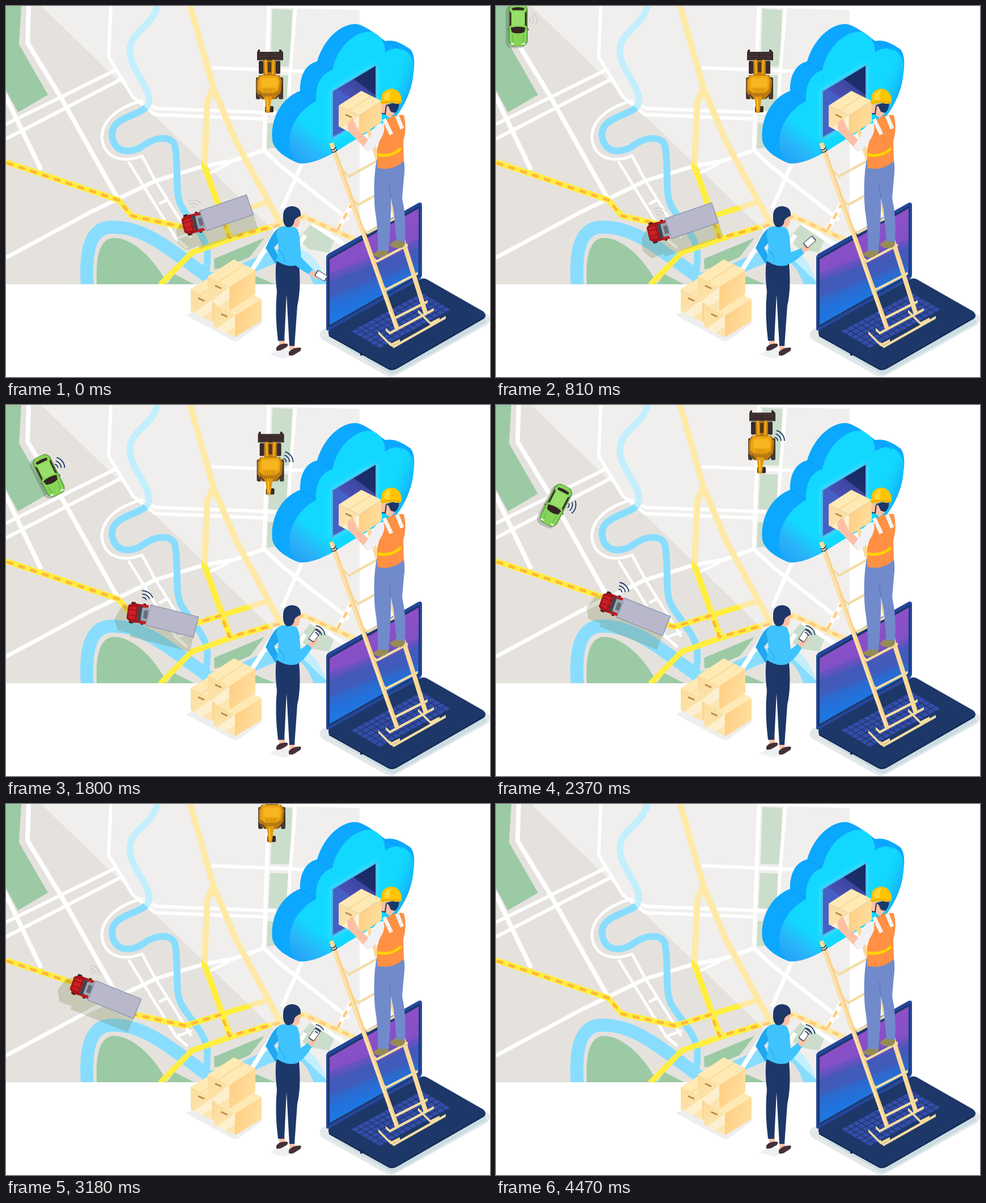
Recreate the animation shown at these times as an HTML page with a canvas. Size 854 px wide and 656 px high, loop 4500 ms.

```html
<!DOCTYPE html>
<html lang="en">
<head>
<meta charset="utf-8">
<title>Delivery tracking</title>
<style>
html, body { margin: 0; width: 100%; height: 100%; overflow: hidden; background: #fff; }
canvas { display: block; }
</style>
</head>
<body>
<canvas id="stage" width="854" height="656"></canvas>
<script>
const W = 854, H = 656, LOOP = 4500, NAVY = '#1d3768';
const stage = document.getElementById('stage').getContext('2d');
let g = stage;

const fill = (color, d) => { g.fillStyle = color; g.fill(new Path2D(d)); };
const line = (color, width, d, dash = []) => {
  g.strokeStyle = color;
  g.lineWidth = width;
  g.setLineDash(dash);
  g.stroke(new Path2D(d));
  g.setLineDash([]);
};
const ramp = (x0, y0, x1, y1, ...stops) => {
  const r = g.createLinearGradient(x0, y0, x1, y1);
  stops.forEach(([at, color]) => r.addColorStop(at, color));
  return r;
};
const rect = (color, x, y, w, h, r = 0) => {
  g.fillStyle = color;
  g.beginPath();
  g.roundRect(x, y, w, h, r);
  g.fill();
};
const placed = (x, y, degrees, draw) => {
  g.save();
  g.translate(x, y);
  g.rotate(degrees * Math.PI / 180);
  draw();
  g.restore();
};
// Draws a right half and its mirror image about x = 0
const mirrored = draw => {
  for (const side of [1, -1]) {
    g.save();
    g.scale(side, 1);
    draw();
    g.restore();
  }
};
function layer(draw) {
  const canvas = document.createElement('canvas');
  canvas.width = W;
  canvas.height = H;
  g = canvas.getContext('2d');
  g.lineJoin = 'round';
  draw();
  g = stage;
  return canvas;
}

// Smooth 0 to 1 between two times
const ease = (from, to, t) => {
  const u = Math.min(1, Math.max(0, (t - from) / (to - from)));
  return u * u * (3 - 2 * u);
};
const since = (t, from) => Math.max(0, t - from);
const signal = t => ease(950, 1400, t) - ease(2550, 3050, t);

const FULL = { land: '#e5e2de', water: '#88ddff', green: '#9ccaa5', road: '#ffee40', dash: '#ffb63c' };
const PALE = { land: '#f0efed', water: '#c3effc', green: '#cbdecb', road: '#ffe9a6', dash: '#ffcb7c' };

function drawMap(c) {
  fill(c.land, 'M0 0H470L624 5V492H0Z');
  fill(c.green, 'M0 0H27L23 68 74 157 21 188 0 149Z');
  fill(c.green, 'M470 5L505 7 501 107 467 106ZM466 122L501 123 498 187 463 184ZM462 207L480 208V250L460 252Z');
  fill(c.green, 'M160 492C158 446 164 411 190 410 222 409 264 448 284 492Z');
  fill(c.green, 'M284 492L297 474 332 492ZM367 447L456 410 430 444 368 470ZM412 492L442 478 475 492Z');
  fill(c.green, 'M515 412L538 386 583 406 570 436 535 430Z');

  const delta = 'M144 500C138 430 150 391 187 391 246 390 290 432 354 477';
  const reach = 'M354 482C410 486 440 445 505 437 535 442 545 465 556 495';
  for (const d of [delta, reach]) line(c.land, 33, d);
  for (const d of [delta, reach]) line(c.water, 23, d);

  line('#fff', 8, 'M40 0L38 65 97 162 197 340M-2 157L62 290');
  line('#fff', 6, 'M0 209L194 113M0 235L204 129M185 0L181 90 224 161 263 192 462 200M243 171L265 181 476 189');
  line('#fff', 7, 'M0 445L150 364 264 309 349 283 400 274 455 255');
  line('#fff', 5, 'M242 167C200 178 170 200 169 232 172 268 204 279 240 265L262 306 327 410M216 275L300 411 328 401M270 350L286 342M300 411L320 428M350 300L395 278');
  line('#fff', 7, 'M464 0L455 255 487 285 605 378M523 277L487 358');
  line('#fff', 6, 'M511 0L501 122 496 215M362 109L535 116M468 0L624 4');
  line('#fff', 8, 'M478 398L418 492M540 384L600 424M528 405L505 440M584 398L610 350');

  line(c.water, 12, 'M267 0C258 40 214 45 219 85 222 115 256 145 252 170 248 195 186 192 187 228 190 264 225 260 242 247 262 232 290 228 298 246 306 290 296 330 310 355 325 382 352 405 355 435 357 460 350 475 352 492');

  line(c.road, 11, 'M325 0L366 145 406 240 488 392M366 145L355 170 350 283 382 372 396 412');
  line(c.road, 10, 'M0 276L198 343 222 371 316 392 464 346M272 493L328 436 396 412 525 372 617 414');
  g.lineCap = 'round';
  line(c.dash, 5, 'M3 278L198 343 222 371 316 392 380 372 394 410 480 388 525 372 617 414M586 394L608 354', [8, 14]);
  g.lineCap = 'butt';
}

const mapLayer = layer(() => {
  drawMap(FULL);
  g.save();
  g.clip(new Path2D('M62 0H624V492H570Z'));
  drawMap(PALE);
  g.restore();
  g.clearRect(624, 0, W, H);
  g.clearRect(0, 492, W, H);
});

// Carton from the left, front and right corners of its lid
function carton([ax, ay], [bx, by], [cx, cy], h) {
  const dx = bx - ax, dy = by - ay;
  fill(ramp(ax, ay, bx, by + h, [0, '#fbdc9b'], [1, '#fde7b5']), `M${ax} ${ay}L${bx} ${by}v${h}L${ax} ${ay + h}Z`);
  fill('#fdf0cf', `M${bx} ${by}v${h * .5}L${ax + dx * .55} ${ay + dy * .55 + h}L${ax + dx * .15} ${ay + dy * .15 + h}Z`);
  fill(ramp(bx, by, cx, cy + h, [0, '#ffcf84'], [1, '#ffdf9f']), `M${bx} ${by}L${cx} ${cy}v${h}L${bx} ${by + h}Z`);
  fill('#ffe9b4', `M${ax} ${ay}L${bx} ${by} ${cx} ${cy} ${cx - dx} ${cy - dy}Z`);
  line('#f5cf88', 1.2, `M${ax + dx / 2} ${ay + dy / 2}l${cx - bx} ${cy - by}`);
  line('#b98a4a', 3, `M${ax + dx / 2 - 6} ${ay + dy / 2 + 7}l11 5`);
}

function drawCloud() {
  const face = 'M517 278C490 262 492 198 547 168 546 138 556 120 576 113 584 72 618 42 645 46 660 50 669 64 669 82 688 68 712 74 719 100 722 140 704 174 690 193L600 246C560 272 535 280 517 278Z';
  fill('#0ca7ff', 'M470 238C466 200 485 163 519 150 518 122 530 102 549 98 560 58 592 30 618 32 630 33 650 47 669 62 684 59 697 65 714 77 724 90 722 120 708 158L600 246C560 272 535 280 517 278 495 270 473 255 470 238Z');
  fill(ramp(500, 275, 590, 165, [0, '#1e9ff8'], [.25, '#2ab3f9'], [.5, '#12d8ff']), face);
  fill(ramp(722, 135, 684, 120, [0, 'rgba(20,160,250,.85)'], [1, 'rgba(18,216,255,0)']), face);
  line('#0b98ee', 1, 'M519 150L547 167M549 98L576 113M669 62L700 79');
  g.shadowColor = '#5ae6ff';
  g.shadowBlur = 10;
  fill('#49b8ea', 'M574 150L654 102V191L574 236Z');
  g.shadowBlur = 0;
  fill(ramp(580, 205, 650, 110, [0, '#4560c6'], [.42, '#4560c6'], [.43, '#4a4fb3'], [.68, '#3c46a0'], [.69, '#1d2f6d'], [1, '#172b5f']),
    'M577 151L652 106V189L577 231Z');
}

function drawLaptop() {
  fill('#e3e8ea', 'M554 577Q560 570 572 566L735 480 853 548Q857 558 846 565L688 653Q678 658 668 652L560 591Q552 586 554 577Z');
  fill('#cbdde2', 'M566 586L678 650Q684 653 690 649L848 560 846 552 682 640Z');
  fill(NAVY, 'M570 572L731 483Q738 480 744 484L842 540Q850 547 843 553L690 641Q682 646 673 641L572 585Q567 580 570 572Z');
  line('#10264f', 2, 'M570 583L674 641Q682 645 690 640L844 551');
  rect('#10264f', 625, 613, 4, 5);
  const at = (a, b) => `${570 + 167 * a + 113 * b} ${575 - 91 * a + 66 * b}`;
  for (let row = 0; row < 6; row++) for (let col = 0; col < 13; col++) {
    const a = .12 + col * .058, b = .17 + row * .076;
    fill('#344da8', `M${at(a, b)}L${at(a + .05, b)} ${at(a + .05, b + .064)} ${at(a, b + .064)}Z`);
  }
  fill('#24479b', 'M565 445Q565 441 569 438L728 348Q734 346 734 352V475Q734 480 729 484L571 573Q565 576 565 570Z');
  fill(NAVY, 'M568 446L730 353V477L568 569Z');
  fill(ramp(618, 402, 668, 531, [0, '#8d50c9'], [.34, '#8450c6'], [.37, '#6653c1'], [.43, '#5c54bf'], [.46, '#4459b8'], [.62, '#3f5cbc'], [.67, '#2f68cc'], [.82, '#2172dd'], [1, '#1d7ae4']),
    'M571 448L728 358V475L571 564Z');
}

function plank(x, y, dx, dy, depth = 12) {
  const back = `l${-dx} ${-dy} ${-depth} ${-depth}Z`, front = `M${x} ${y}l${depth} ${depth} ${dx} ${dy}`;
  fill('#f3dca2', `${front}v5${back}`);
  fill('#fff6d9', front + back);
}

function drawLadder() {
  line('#fbd99a', 8, 'M640 220L741 545');
  for (let i = 0; i < 6; i++) plank(593 + 16.4 * i, 287 + 50 * i, 52 + i, -29);
  plank(670, 569, 78, -42, 7);
  plank(657, 575, 16, -8, 22);
  plank(727, 537, 16, -8, 22);
  plank(677, 593, 92, -52, 7);
  line('#fbd28a', 8, 'M574 242L690 570');
  line('#ffe5b2', 3, 'M573 243L688 569');
  line(NAVY, 1.5, 'M573 254Q580 256 582 249M574 258Q582 260 584 253');
}

function drawWorker() {
  fill('#958c55', 'M648 438L663 428 676 430Q676 440 664 444 650 446 648 438ZM677 421L690 412 704 415Q706 424 697 428 682 430 677 421Z');
  fill('#718acb', 'M654 272L701 268Q705 285 702 305L699 340Q707 375 704 417L689 416 684 362 679 339Q680 375 675 433H656Q657 395 651 360 647 310 654 272Z');
  line('#5f78bb', 1.5, 'M679 339L676 315');
  fill('#fec0a5', 'M611 198C616 204 617 214 623 222L644 240 638 257 612 229C602 223 600 207 605 205Z');
  fill('#ff9044', 'M668 204Q682 190 702 193 708 215 701 240L702 274Q682 293 655 286L655 252Z');
  fill('#f0f1f5', 'M664 207C653 208 647 218 643 231L631 248 640 258Q655 248 664 230 671 214 664 207Z');
  line('#f4f3f2', 7, 'M667 200L680 227M690 194L699 217');
  line('#ffd400', 5, 'M656 263Q680 268 697 252');
  fill('#fec0a5', 'M663 174L679 172 686 190 677 198 668 191 662 189Z');
  fill(NAVY, 'M670 175L693 169Q695 183 686 189L679 187 675 178Z');
  line(NAVY, 2, 'M671 176L669 191 663 190');
  fill('#ffc400', 'M663 168Q660 148 680 146 699 148 698 171 690 175 681 171L663 174 660 169Z');
  fill('#ffd83a', 'M667 165Q667 150 680 149 676 156 677 168Z');
  line('#eda900', 2, 'M662 171Q682 167 698 171');
}

function drawWoman() {
  fill('#eef0f3', 'M465 616L485 606 520 612 490 624Z');
  fill('#fec0a5', 'M482 588L492 588 492 600H482ZM500 595L509 595 510 608H500Z');
  fill('#463038', 'M477 604Q482 596 496 597 500 601 492 605 482 611 477 609ZM499 612Q506 603 520 604 523 609 514 613 504 621 499 617Z');
  fill(NAVY, 'M477 450L517 456Q521 500 514 530L509 601H500L495 510 491 592H480Q474 545 478 505 474 475 477 450Z');
  fill('#fec0a5', 'M500 375L518 370Q521 388 512 392L507 398H495Z');
  fill('#20a7ef', 'M483 392C472 397 466 411 458 428L475 455 483 448 473 427 487 412Z');
  fill('#3ec3ff', 'M483 391Q500 386 514 394 522 416 515 458 496 464 477 450 484 424 477 405 478 395 483 391Z');
  line('#26ade9', 1.5, 'M480 430Q492 440 491 452');
  fill(NAVY, 'M489 371Q489 354 506 354 521 356 520 371 512 374 509 379 508 392 496 391 488 387 489 371Z');
}

const frontLayer = layer(() => {
  drawCloud();
  drawLaptop();
  drawLadder();
  carton([587, 176], [623, 194], [663, 168], 37);
  drawWorker();
  fill('#eeeeef', 'M318 547L340 535 451 558 451 562 410 591 Q404 595 397 590Z');
  carton([326, 500], [364, 519], [400, 497], 40);
  carton([367, 528], [404, 547], [451, 518], 39);
  carton([356, 478], [394, 497], [440, 467], 42);
  drawWoman();
});

// Signal arcs; reach below 1 draws them only in part
function waves(x, y, dir, alpha, reach = 1) {
  if (alpha <= 0 || reach <= 0) return;
  g.globalAlpha = alpha;
  g.strokeStyle = NAVY;
  g.lineWidth = 1.8;
  placed(x, y, dir, () => {
    for (let r = 7; r < 20; r += 6) {
      g.beginPath();
      g.arc(0, 0, r, -.65, -.65 + 1.3 * reach);
      g.stroke();
    }
  });
  g.globalAlpha = 1;
}

// Follows the road down to the bend, then up and away at higher speed
function drawTruck(t) {
  const x = 348 - .054 * t - .139 * since(t, 3000);
  const y = Math.min(519 - .4 * x, 266 + .42 * x);
  const tilt = -19 + 41 * ease(900, 2150, t);
  const cabTilt = -14 + 34 * ease(900, 2400, t);
  placed(x, y, tilt, () => fill('rgba(105,118,55,.24)', 'M-50 0L-36 -12H-8L87 10V45H-22V39L-45 40 -56 22Z'));
  placed(x + 2, y, cabTilt, () => {
    rect('#3a2528', -34, -19, 8, 38, 2);
    rect('#2f2a30', -13, -19, 5, 38, 1);
    fill('#a81419', 'M-39 -11Q-36 -16 -25 -17L-4 -16V16L-25 17Q-36 16 -39 11Z');
    fill('#cb2026', 'M-36 -9L-21 -12V12L-36 9Z');
    line('#8f1015', 1.5, 'M-37 -5H-20M-37 5H-20M-23 -15V15');
    fill('#3c4650', 'M-20 -13L-14 -15V15L-20 13Z');
    rect('#9aa5af', -14, -12, 12, 24, 2);
    rect('#656e79', -10, -7, 7, 14, 1);
    for (const edge of [-17, 13]) rect('#c51d23', -16, edge, 13, 4);
    waves(-15, -22, -65, .12 + .88 * signal(t));
  });
  placed(x, y, tilt, () => {
    rect('#b9b8ca', 0, -18.5, 87, 37);
    g.strokeStyle = '#8d9aae';
    g.lineWidth = 1.5;
    g.strokeRect(0, -18.5, 87, 37);
  });
}

// Comes down the avenue at a steady pace and turns off to the left
function drawCar(t) {
  const y = -41 + .092 * t;
  const x = 39 + .58 * since(y, 62) - .28 * since(t, 2450);
  const tilt = 88 * ease(1800, 2800, t) - 26 * ease(850, 1500, t);
  placed(x - 5, y + 3, tilt, () => rect('rgba(70,80,75,.28)', -17, -38, 35, 76, 11));
  placed(x, y, tilt, () => {
    rect('#4f8c38', -19, 6, 38, 4, 2);
    rect('#5c9f43', -17, -38, 34, 76, 11);
    rect('#86d458', -15, -37, 30, 74, 10);
    fill('#332522', 'M-13 5Q0 1 13 5L11 13Q0 17 -11 13Z');
    fill('#332522', 'M-11 -30Q0 -33 11 -30L10 -26H-10Z');
    mirrored(() => {
      fill('#3d3029', 'M15 -25L12 -21V0L15 3Z');
      line('#63ad42', 1, 'M10 17L8 33');
      rect('#eaf7df', 7, 32, 6, 3, 1);
    });
    rect('#97df69', -11, -24, 22, 25, 4);
    waves(14, -8, -12, .1 + .9 * signal(t));
  });
}

function drawLoader(t) {
  placed(465 + 4 * ease(1350, 2400, t), 77 - .066 * since(t, 1350), 0, () => {
    fill('#392a2a', 'M-22 19V5L-20 0H-17V4H17V0H20L24 5V19Z');
    rect('#b97a12', -11, 19, 22, 28);
    mirrored(() => {
      rect('#3a2b2b', 11, 20, 8, 23, 2);
      rect('#463735', 16, 49, 8, 39, 3);
      line('#eda412', 4, 'M7 18L6 44');
      for (let y = 3; y < 18; y += 5) line('#54403a', 1, `M2 ${y + 4}H20`);
    });
    rect('#51351c', -3, 22, 6, 18, 1);
    fill('#b97a12', 'M-18 45H17L22 55 20 75 10 88H-14L-23 75V54Z');
    fill('#eda412', 'M-16 46H15L18 56 16 71 8 77H-11L-20 71V56Z');
    rect('#f7b51f', -15, 50, 29, 17, 3);
    for (let x = -9; x < 10; x += 4) line('#b97a12', 1, `M${x} 69V77`);
    mirrored(() => line('#543a24', 2, 'M18 79L11 87'));
    rect('#362a2a', -8, 100, 15, 11, 2);
    fill('#e29b10', 'M-9 83H4L0 112H-6Z');
    line('#ffc733', 2, 'M-4 87L-3 107');
    waves(21, 54, -38, signal(t));
  });
}

function drawArm(t) {
  fill('#3ec3ff', 'M505 392Q516 393 518 409L521 446 513 458 504 450 505 425Z');
  placed(513, 449, Math.max(-45, 41 - t * .088), () => {
    fill('#3ec3ff', 'M-3 -9Q14 -8 33 -5V5Q13 10 0 8 -10 4 -3 -9Z');
    fill('#fec0a5', 'M32 -4L42 -6 51 -7 53 -2 47 4 32 4Z');
    placed(51, -7, -10, () => {
      rect('#4a5568', -11, -6, 22, 12, 2.5);
      rect('#fff', -9, -5, 18, 10, 1);
    });
  });
  const reach = ease(1050, 1500, t) - .7 * (ease(2850, 3600, t) - ease(3700, 4150, t));
  waves(544, 409, -45, 1, reach);
}

function frame(now) {
  const t = now % LOOP;
  stage.fillStyle = '#fff';
  stage.fillRect(0, 0, W, H);
  stage.drawImage(mapLayer, 0, 0);
  drawTruck(t);
  drawCar(t);
  drawLoader(t);
  stage.drawImage(frontLayer, 0, 0);
  drawArm(t);
}

const start = performance.now();
const tick = () => {
  frame(performance.now() - start);
  requestAnimationFrame(tick);
};
tick();
</script>
</body>
</html>
```
